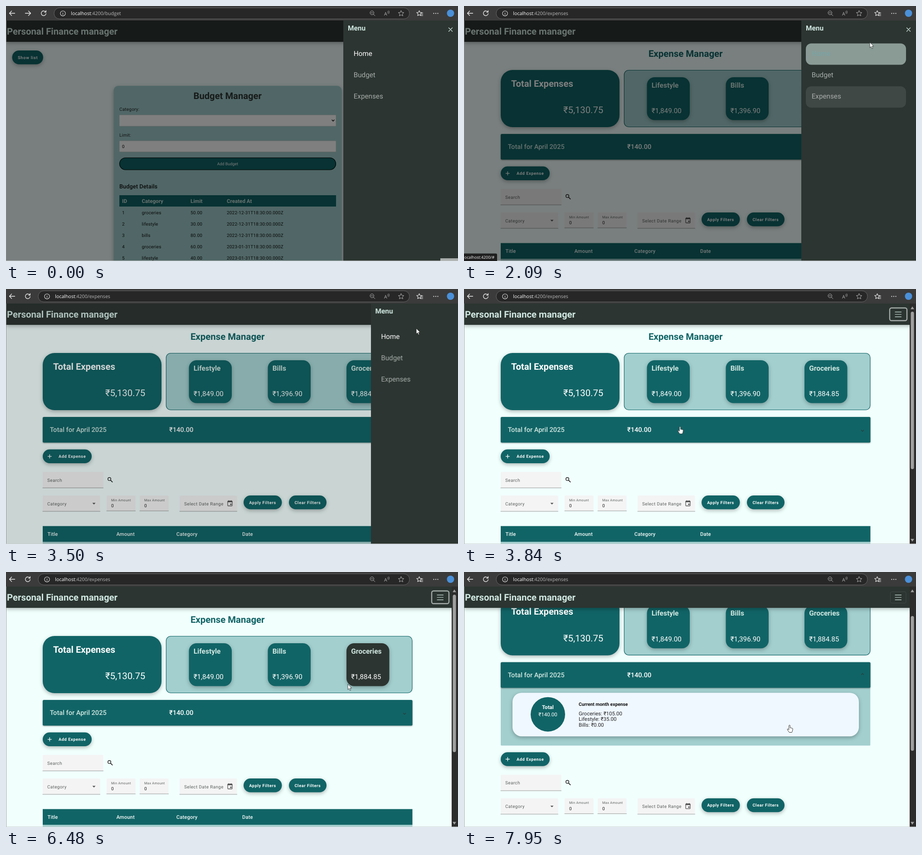
These frames come from a looping animation (997 px wide and 562 px high, 8 s). An HTML page:

```html
<!DOCTYPE html>
<html lang="en">
<head>
<meta charset="utf-8">
<title>Personal Finance manager</title>
<style>
html, body { margin: 0; width: 100%; height: 100%; overflow: hidden; background: #3b3b3b; }
svg { display: block; }
text { font-family: Roboto, sans-serif; text-rendering: geometricPrecision; white-space: pre; }
.ui { font-family: "Open Sans", "Noto Sans", sans-serif; }
.b { font-weight: 700; }
.m { font-weight: 500; }
.mid { text-anchor: middle; }
.line { fill: none; stroke-linecap: round; stroke-linejoin: round; }
.lift { filter: drop-shadow(0 3px 4px rgba(0,0,0,.28)); }
.low { filter: drop-shadow(0 1px 1.5px rgba(0,0,0,.4)); }

/* One loop is 8 s, so 1% is 80 ms. */
.run { animation: 8s linear infinite; }
.step { animation: 8s step-end infinite; }

#old { animation-name: old; }
#new { animation-name: new; }
.old { animation-name: old; }
.new { animation-name: new; }
@keyframes old { 0% { opacity: 1 } 18.625%, 100% { opacity: 0 } }
@keyframes new { 0% { opacity: 0 } 18.625%, 100% { opacity: 1 } }

#corner { animation-name: corner; }
@keyframes corner { 0% { opacity: 1 } .875%, 100% { opacity: 0 } }

#scroll { animation-name: scroll; }
@keyframes scroll {
  0% { transform: none }
  96.125% { transform: translateY(-4.6px) }
  96.875% { transform: translateY(-24px) }
  97.75% { transform: translateY(-50px) }
  98.5% { transform: translateY(-71px) }
  99.375%, 100% { transform: translateY(-83.3px) }
}
#thumb { animation-name: thumb; }
@keyframes thumb {
  0%, 88.5% { y: 50px; height: 347px }
  91.5%, 96% { y: 50px; height: 297px }
  96.125% { y: 53px; height: 297px }
  99.375%, 100% { y: 97px; height: 297px }
}
#lower { animation-name: lower; }
@keyframes lower {
  0% { transform: none }
  88.5% { transform: none; animation-timing-function: cubic-bezier(.4,0,.2,1) }
  91.5%, 100% { transform: translateY(127px) }
}
#detail { animation-name: detail; }
@keyframes detail {
  0% { clip-path: inset(0 0 128px 0) }
  88.5% { clip-path: inset(0 0 128px 0); animation-timing-function: cubic-bezier(.4,0,.2,1) }
  91.5%, 100% { clip-path: inset(0) }
}
#chevron { animation-name: chevron; transform-box: fill-box; transform-origin: center; }
@keyframes chevron {
  0%, 88.5% { transform: none }
  91.5%, 100% { transform: translateY(-4px) rotate(180deg) }
}
.dark { fill: #116466; animation: dark 8s linear infinite; }
@keyframes dark { 0%, 8.5%, 100% { fill: #116466 } 2.5%, 6% { fill: #2c3531 } }

#side { animation-name: side; }
@keyframes side {
  0% { transform: none }
  42.5% { transform: none; animation-timing-function: ease-in-out }
  46.25%, 100% { transform: translateX(256px) }
}
#shade { animation-name: shade; }
@keyframes shade { 0%, 42.5% { opacity: .5 } 44.4%, 100% { opacity: 0 } }
#bar { animation-name: bar; }
@keyframes bar { 0% { opacity: 0 } 46.25%, 100% { opacity: 1 } }
#ring { animation-name: ring; }
@keyframes ring { 0% { opacity: 0 } 46.25% { opacity: 1 } 87.125%, 100% { opacity: 0 } }
#closeRing { animation-name: closeRing; }
@keyframes closeRing { 0% { opacity: 0 } 41.2%, 100% { opacity: 1 } }
#focus { animation-name: focus; }
@keyframes focus { 0% { opacity: 0 } 16.875% { opacity: 1 } 41.2%, 100% { opacity: 0 } }

#hoverHome { animation-name: hoverHome; }
@keyframes hoverHome { 0%, 23.6% { opacity: 0 } 25.2%, 25.35% { opacity: 1 } 27.2%, 100% { opacity: 0 } }
#hoverBudget { animation-name: hoverBudget; }
@keyframes hoverBudget { 0%, 22.6% { opacity: 0 } 23.7% { opacity: .6 } 25%, 100% { opacity: 0 } }
#hoverExpenses { animation-name: hoverExpenses; }
@keyframes hoverExpenses { 0%, 8.2% { opacity: 0 } 10%, 22.4% { opacity: 1 } 24.3%, 100% { opacity: 0 } }

#tipExpenses { animation-name: tipExpenses; }
@keyframes tipExpenses { 0%, 11.5% { opacity: 0 } 13.375%, 16.87% { opacity: 1 } 16.875%, 100% { opacity: 0 } }
#tipHome { animation-name: tipHome; }
@keyframes tipHome { 0%, 23.7% { opacity: 0 } 24.5%, 31.25% { opacity: 1 } 32.2%, 100% { opacity: 0 } }

#cursor { animation-name: cursor; }
@keyframes cursor {
  0%, .875% { transform: translate(988px, 556px); animation-timing-function: ease-in-out }
  10%, 21.8% { transform: translate(847px, 194px) }
  23.5% { transform: translate(870px, 145px) }
  26.125% { transform: translate(895px, 80px) }
  31.25%, 32% { transform: translate(925px, 60px) }
  37% { transform: translate(962px, 38px) }
  39.5%, 43% { transform: translate(982px, 48px) }
  48% { transform: translate(477px, 303px) }
  51.5%, 56.6% { transform: translate(322px, 225px) }
  62.375%, 65.1% { transform: translate(455px, 225px) }
  71.625%, 73.3% { transform: translate(625px, 225px) }
  76.875%, 80.2% { transform: translate(772px, 225px) }
  81% { transform: translate(754px, 247px) }
  85.25%, 87.5% { transform: translate(735px, 312px) }
  92.625%, 100% { transform: translate(718px, 337px) }
}
#hand { animation-name: hand; }
@keyframes hand {
  0%, 25.5%, 43.5%, 49% { opacity: 0 }
  8.1%, 39%, 47.3%, 83.4%, 100% { opacity: 1 }
}
#arrow { animation-name: arrow; }
@keyframes arrow {
  0%, 8.1%, 39%, 47.3%, 83.4%, 100% { opacity: 0 }
  .875%, 25.5%, 43.5%, 49% { opacity: 1 }
}
#click { animation-name: click; }
@keyframes click {
  0%, 19.5%, 43%, 89%, 100% { opacity: 0 }
  16.875%, 41.2%, 87.125% { opacity: 1 }
}
</style>
</head>
<body>
<svg id="stage" width="997" height="562" viewBox="0 0 997 562"></svg>
<script>
const TEAL = '#116466', DARK = '#2c3531', MINT = '#d1e8e2', PALE = '#a3cfcf', PAGE = '#f1fffd';

// y is the middle of the capital letters
const text = (x, y, size, str, fill, cls = '', gap = 0) =>
  `<text x="${x}" y="${(y + size * .355).toFixed(2)}" font-size="${size}" fill="${fill}" class="${cls}" letter-spacing="${gap}">${str}</text>`;
const box = (x, y, w, h, r, fill, more = '') =>
  `<rect x="${x}" y="${y}" width="${w}" height="${h}" rx="${r}" fill="${fill}" ${more}/>`;
const line = (d, color, width = 1, more = '') =>
  `<path class="line" d="${d}" stroke="${color}" stroke-width="${width}" ${more}/>`;
const ring = (x, y, r, color, width = 1) =>
  `<circle cx="${x}" cy="${y}" r="${r}" fill="none" stroke="${color}" stroke-width="${width}"/>`;
const pill = (x, y, w, str, tx, gap) =>
  box(x, y, w, 30.5, 15.2, TEAL, 'class="lift"') + text(tx, y + 15.3, 9.2, str, '#fff', 'b', gap);

function budgetPage() {
  const cols = [256, 299.5, 407, 487];
  const rows = [['groceries', '50.00', 2022], ['lifestyle', '30.00', 2022], ['bills', '80.00', 2022],
    ['groceries', '60.00', 2023], ['lifestyle', '40.00', 2023]];
  const heads = ['ID', 'Category', 'Limit', 'Created At'];
  return box(0, 79, 997, 483, 0, PAGE)
    + pill(13.5, 98, 68.5, 'Show list', 26, .72)
    + box(237.5, 176, 503, 400, 10, PALE, 'class="lift"')
    + text(488.7, 198, 20.2, 'Budget Manager', DARK, 'b mid')
    + text(250, 227, 10, 'Category:', '#222', '', .2)
    + box(250, 240, 478, 25, 1, '#fff', 'stroke="#bbb" stroke-width=".6"')
    + line('M719 251l2.5 2.7 2.5-2.7', '#000', 1.3)
    + text(250, 284, 10, 'Limit:', '#222', '', .2)
    + box(250, 297, 478, 24.5, 1, '#fff', 'stroke="#bbb" stroke-width=".6"')
    + text(256, 309.5, 9.6, '0', '#000')
    + box(250.5, 334.5, 477, 26.5, 13.2, TEAL, 'stroke="#000" stroke-width="1.2"')
    + text(488.8, 348, 8.9, 'Add Budget', '#fff', 'mid')
    + text(250, 397, 12.7, 'Budget Details', '#111', 'm', .1)
    + box(250, 417, 478, 25, 0, TEAL)
    + heads.map((h, i) => text(cols[i], 430.3, 11.6, h, MINT, 'b')).join('')
    + rows.map(([cat, limit, year], i) => {
      const date = `${year}-${year == 2022 ? '12' : '01'}-31T18:30:00.000Z`;
      return [i + 1, cat, limit, date].map((v, c) =>
        text(cols[c], 455 + i * 25.15, 10, v, '#111', '', .18)).join('');
    }).join('');
}

const card = (x, name, sum, delay) =>
  `<rect x="${x}" y="157" width="94.5" height="94.5" rx="17" class="dark lift" style="animation-delay:${delay}s"/>`
  + text(x + 10.2, 174, 15.5, name, MINT, 'b') + text(x + 10.2, 230.5, 15.2, sum, '#fff');
const field = (x, y, w, h) =>
  box(x, y, w, h, 2, '#f4f4f4') + line(`M${x} ${y + h}h${w}`, '#8d8d8d', .9);
const hint = (x, y, str) => text(x, y, 9.9, str, '#5c5f5f', '', .4);
const amount = (x, str) => field(x, 455, 63.5, 34)
  + text(x + 10, 465, 7.4, str, '#5c5f5f', '', .35) + text(x + 10, 477.5, 10, '0', '#222');

function expensesPage() {
  const detail = box(81, 338, 815.5, 128, 2, PALE)
    + box(107, 349.5, 764, 96, 20, '#f0f8ff', 'class="lift"')
    + `<circle cx="185" cy="397" r="38" fill="${TEAL}"/>`
    + text(185, 381.5, 11.6, 'Total', '#fff', 'b mid')
    + text(185, 397.5, 11.5, '₹140.00', '#fff', 'mid')
    + text(253, 374.5, 10.3, 'Current month expense', '#111', 'b')
    + ['Groceries: ₹105.00', 'Lifestyle: ₹35.00', 'Bills: ₹0.00']
      .map((s, i) => text(253, 395 + i * 12.6, 11.5, s, '#222')).join('');

  const lower = pill(81, 353.5, 108, 'Add Expense', 116, .6)
    + line('M92.3 368.8h8M96.3 364.8v8', '#fff', 1.3)
    + field(81, 403, 133.5, 35.3) + hint(91, 421, 'Search')
    + ring(228, 418.8, 3.3, '#222', 1.4) + line('M230.6 421.4l4 4', '#222', 1.6)
    + field(81, 455, 126.5, 35) + hint(91, 473, 'Category')
    + '<path d="M190.5 471.3h7l-3.5 3.6z" fill="#555"/>'
    + amount(222, 'Min Amount') + amount(295, 'Max Amount')
    + field(383, 455, 126.5, 35) + hint(393, 473, 'Select Date Range')
    + box(489, 467.2, 10, 10.8, 1.2, 'none', 'stroke="#555" stroke-width="1.3"')
    + box(489, 467, 10, 3, 0, '#555') + box(494.5, 473, 3, 3, 0, '#555')
    + line('M491.4 466v1M496.6 466v1', '#555', 1.2)
    + pill(524, 455, 84.5, 'Apply Filters', 536.3, .6)
    + pill(624, 455, 83, 'Clear Filters', 636.5, .6)
    + box(81, 522.5, 815.5, 35, 0, TEAL) + box(81, 557.5, 815.5, 36, 0, PALE)
    + [['Title', 91.5], ['Amount', 243.5], ['Category', 375.8], ['Date', 521]]
      .map(([s, x]) => text(x, 540.3, 11.2, s, '#f4fbfa', 'm', .15)).join('');

  return box(0, 79, 997, 483, 0, PAGE) + '<g id="scroll" class="step">'
    + text(488.7, 104.5, 20.4, 'Expense Manager', TEAL, 'b mid')
    + '<rect x="81" y="141" width="262" height="126" rx="26" class="dark lift" style="animation-delay:4.06s"/>'
    + text(104, 170.5, 20.2, 'Total Expenses', '#fff', 'b')
    + text(219, 229, 20.3, '₹5,130.75', '#fff')
    + box(353.3, 141.5, 542.7, 125, 10, PALE, `stroke="${TEAL}" stroke-width="1.2"`)
    + card(403.5, 'Lifestyle', '₹1,849.00', 4.82)
    + card(577.5, 'Bills', '₹1,396.90', 5.45)
    + card(751, 'Groceries', '₹1,884.85', 6.01)
    + `<g id="lower" class="run">${lower}</g><g id="detail" class="run">${detail}</g>`
    + box(81, 282, 815.5, 56.5, 2.5, TEAL, 'class="low"')
    + text(96.7, 310.3, 14.6, 'Total for April 2025', MINT, 'm')
    + text(360, 310.3, 14.6, '₹140.00', '#fff', 'm')
    + line('M876.3 311l2.7 2.8 2.7-2.8', '#27403f', 1.3, 'id="chevron" style="animation-name:chevron"').replace('class="line"', 'class="line run"')
    + '</g>';
}

function header() {
  return box(0, 32, 997, 47, 0, DARK, 'class="lift"')
    + text(2, 55.8, 20.35, 'Personal Finance manager', MINT, 'b')
    + box(940.5, 43.5, 34.5, 25, 3, DARK, 'stroke="#404946" stroke-width="1"')
    + box(939, 41.8, 38, 28, 4, DARK, 'id="ring" class="step" stroke="#a4aba8" stroke-width="2.4"')
    + line('M951 50.7h13.5M951 56h13.5M951 61.3h13.5', MINT, 1.2);
}

const scrollbar = () => box(983, 32, 14, 530, 0, '#2c2c2c')
  + '<rect id="thumb" class="run" x="985.5" y="50" width="7" height="347" rx="3.5" fill="#9f9f9f"/>'
  + '<path d="M985 44.5h8l-4-6zM985 550.8h8l-4 6z" fill="#9f9f9f"/>';

function sidebar() {
  const items = [['Home', 104.5, '#fff'], ['Budget', 152, '#a6acaa'], ['Expenses', 199, '#a6acaa']];
  const back = (y, fill) => box(754, y - 22, 221, 47, 12, fill);
  return box(744, 32, 253, 530, 0, DARK)
    + text(754, 48.8, 15.4, 'Menu', MINT, 'b')
    + box(969, 40.5, 23.5, 23, 4, 'none', 'id="closeRing" class="step" stroke="#89908d" stroke-width="2"')
    + line('M976.5 48l8 8M984.5 48l-8 8', MINT, 1.2)
    + `<g id="focus" class="step">${back(199, '#404845')}</g>`
    + items.map(([s, y, fill]) => text(766.7, y, 15.25, s, fill)
      + `<g id="hover${s}" class="run">${back(y, MINT)}${text(766.7, y, 15.25, s, TEAL)}</g>`).join('');
}

const star = (x, y, r) => 'M' + Array.from({ length: 10 }, (_, i) => {
  const a = i * Math.PI / 5, d = i % 2 ? r * .48 : r;
  return `${(x + d * Math.sin(a)).toFixed(1)} ${(y - d * Math.cos(a)).toFixed(1)}`;
}).join('L') + 'z';

function address(dx, path) {
  const x = 71 + dx;
  return box(x, 4, 890 - x, 24.5, 12.2, '#272727', 'stroke="#686868" stroke-width="1"')
    + line(`M${52.5 + dx} 13.2a5.3 5.3 0 1 0 .8 3.5M${53.3 + dx} 10v3.6h-3.6`, '#eee', 1.3)
    + ring(90.5 + dx, 16.3, 5.6, '#ddd', 1.1)
    + line(`M${90.5 + dx} 15.8v3M${90.5 + dx} 13.5v.1`, '#ddd', 1.2)
    + text(108.3 + dx, 16.5, 10.6, `localhost<tspan fill="#b9b9b9">:4200/${path}</tspan>`, '#fff', 'ui');
}

function toolbar() {
  const grey = '#b5b5b5';
  return box(0, 0, 997, 32, 0, '#3b3b3b')
    + line('M19.5 16h-12M12.5 11l-5 5 5 5', '#eee', 1.3)
    + `<g class="step old">${line('M42.5 16h12M49.5 11l5 5-5 5', '#eee', 1.3)}${address(35, 'budget')}</g>`
    + `<g class="step new">${address(0, 'expenses')}</g>`
    + ring(807.3, 15, 4.2, grey) + line('M805.3 15h4M810.5 18.2l3.3 3.3', grey)
    + text(834, 17, 10.5, 'A', grey, 'ui') + line('M842 11.5q2 2 0 4.5M844 10.2q3 3.3 0 6.8', grey, .9)
    + line(star(871.5, 16.5, 6.4), grey) + line(star(911.5, 16.3, 6), '#eee', 1.1)
    + line('M915.5 15h4M916 18h3.5M914.5 21h5', '#eee', 1.1)
    + [943.5, 948, 952.5].map(x => `<circle cx="${x}" cy="16.3" r="1.1" fill="#eee"/>`).join('')
    + '<circle cx="980.5" cy="16" r="8" fill="#4a90d9"/>';
}

const tip = (id, w, path) => `<g id="${id}" class="run">`
  + `<path d="M0 545.5h${w - 3}q3 0 3 3v14H0z" fill="#1f1f1f"/>`
  + text(.8, 554.3, 8.85, `ocalhost:4200/${path}`, '#f4f4f4', 'ui') + '</g>';

const pointer = () => '<g id="cursor" class="run">'
  + '<circle id="click" class="step" cx="0" cy="1" r="9.7" fill="#d2d200" fill-opacity=".82"/>'
  + '<path id="arrow" class="step" d="M0 0v12l2.8-2.6 1.9 4.5 2-.8-1.9-4.4h3.8z" fill="#fff" stroke="#222" stroke-width=".8"/>'
  + '<path id="hand" class="step" d="M-1.3 1.3q1.3-2.2 2.6 0v5l4.4.9q1.6.4 1.5 2l-.9 4.6-1.2 2.7h-5.6l-3.2-4.4-1.3-2.6q1-1.4 2.4 0l1.3 1.2z" fill="#fff" stroke="#222" stroke-width=".9"/></g>';

document.getElementById('stage').innerHTML =
  `<g id="old" class="step">${budgetPage()}</g><g id="new" class="step">${expensesPage()}</g>`
  + header()
  + `<g id="bar" class="step">${scrollbar()}</g>`
  + box(0, 32, 997, 530, 0, '#000', 'id="shade" class="run"')
  + `<g id="side" class="run">${sidebar()}</g>`
  + toolbar()
  + box(958, 556, 39, 6, 0, '#a9aeac', 'id="corner" class="step"')
  + box(0, 32, .8, 530, 0, '#8a8f8e') + box(0, 561.2, 997, .8, 0, '#c8cccb')
  + tip('tipExpenses', 105, 'expenses') + tip('tipHome', 73, '#')
  + pointer();
</script>
</body>
</html>
```
